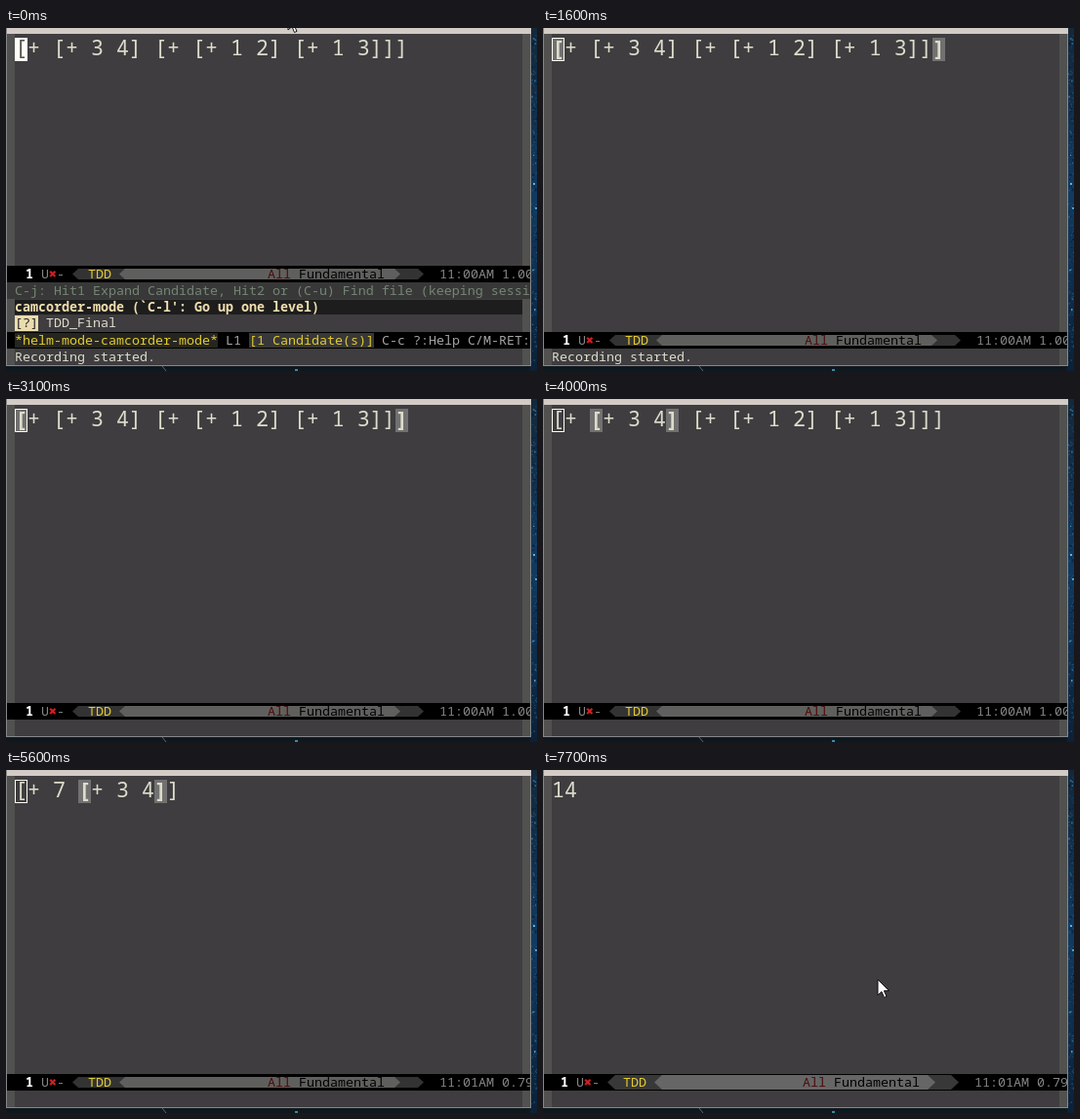
Recreate the animation shown at these times as an HTML page. Size 544x352 px, loop 7800 ms.

```html
<!DOCTYPE html>
<html lang="en">
<head>
<meta charset="utf-8">
<title>Stepwise evaluation</title>
<style>
  html, body { margin: 0; width: 100%; height: 100%; overflow: hidden; background: #10181f; }
  svg { display: block; width: 544px; height: 352px; }
  text { font: 13.333px "Noto Sans Mono", "DejaVu Sans Mono", monospace; white-space: pre; }
  .code text { font-size: 21.667px; fill: #dcdccc; }
  text.bold, .code text.bold { font-weight: 700; }
</style>
</head>
<body>
<svg id="stage" viewBox="0 0 544 352" xmlns="http://www.w3.org/2000/svg"></svg>
<script>
const LOOP = 7800;
const HELM_END = 300, BLUR = 1200, MSG_END = 2700, FOCUS = 7150, BLINK = 7650, MINUTE = 4070;
const CELL = 13, LEFT = 9;

// Buffer text, start time, and the columns of the matched brackets
const steps = [
  [0, "[+ [+ 3 4] [+ [+ 1 2] [+ 1 3]]]", []],
  [HELM_END, "[+ [+ 3 4] [+ [+ 1 2] [+ 1 3]]]", [0, 30]],
  [3550, "[+ [+ 3 4] [+ [+ 1 2] [+ 1 3]]]", [3, 9]],
  [4070, "[+ 7 [+ [+ 1 2] [+ 1 3]]]", [8, 14]],
  [4590, "[+ 7 [+ 3 [+ 1 3]]]", [10, 16]],
  [5110, "[+ 7 [+ 3 4]]", [5, 11]],
  [5630, "[+ 7 7]", [0, 6]],
  [6150, "14", []]
];

const rect = (x, y, w, h, fill, more = "") =>
  `<rect x="${x}" y="${y}" width="${w}" height="${h}" fill="${fill}" ${more}/>`;
const text = (x, y, s, fill, cls = "") =>
  `<text x="${x}" y="${y}" fill="${fill}" class="${cls}">${s}</text>`;

function random(seed) {
  return () => (seed = (seed * 16807) % 2147483647) / 2147483647;
}

function desktop() {
  const rnd = random(4711);
  const colors = ["#1c4a70", "#0b1c33", "#2b6f9c", "#0a2540", "#4aa3cf"];
  let out = rect(0, 0, 544, 352, "#10181f") + rect(537, 0, 7, 352, "url(#sky)");
  for (let i = 0; i < 230; i++) {
    const x = 538 + rnd() * 6, y = rnd() * 346, size = 0.6 + rnd() * 1.1;
    out += rect(x.toFixed(1), y.toFixed(1), size.toFixed(1), size.toFixed(1),
      colors[Math.floor(rnd() * rnd() * 5)]);
  }
  return out + rect(540, 159, 2, 2, "#55b8e6") + rect(542, 184, 2, 2, "#4aa3cf") +
    rect(296, 350, 3, 2, "#3b88a8") +
    `<path d="M160 347l4 5" stroke="#59666c"/>`;
}

function frame() {
  return rect(0, 0, 538, 347, "#85888a") + rect(1, 0, 537, 6, "#d3cbc5") +
    rect(1, 6, 536, 340, "#3f3d3f") +
    rect(1, 6, 8, 340, "#515150") + rect(529, 6, 8, 340, "#515150");
}

function arrowBar(x1, x2, y, h, tip, fill) {
  const mid = y + h / 2;
  return `<path fill="${fill}" d="M${x1} ${mid}L${x1 + tip} ${y}H${x2 - tip}L${x2} ${mid}L${x2 - tip} ${y + h}H${x1 + tip}Z"/>`;
}

function modeLine(y, active, clock) {
  const dx = active ? -2 : 0, base = y + 13;
  const top = active ? y + 1 : y + 3, h = active ? 15 : 11, tip = active ? 8 : 6;
  const label = (x, s, fill, cls) => text(x + dx, base, s, fill, cls);
  return rect(1, y, 536, 17, "#000") +
    arrowBar(68 + dx, 428 + dx, top, h, tip, active ? "#383838" : "#333") +
    arrowBar(116 + dx, 404 + dx, top, h, tip, active ? "#666" : "#5f605d") +
    label(20, "1", "#fff", "bold") + label(36, "U", "#858585") +
    label(44, "✖", "#d02020") + label(52, "-", "#858585") +
    label(84, "TDD", "#e3cc2e") + label(268, "All", "#4d0d0d") +
    label(300, "Fundamental", "#000") + label(444, clock, "#858585");
}

function helm() {
  return rect(1, 261, 536, 17, "#383838") +
    text(9, 274, "C-j: Hit1 Expand Candidate, Hit2 or (C-u) Find file (keeping session)", "#748574") +
    rect(9, 279, 520, 15, "#1d1d1d") +
    text(9, 291, "camcorder-mode (`C-l': Go up one level)", "#f0dfaf", "bold") +
    rect(9, 295, 24, 16, "#eadcae") + text(9, 307, "[?]", "#222") +
    text(41, 307, "TDD_Final", "#dcdccc") +
    rect(1, 312, 536, 17, "#000") + rect(9, 313, 208, 15, "#262620") +
    text(9, 325, "*helm-mode-camcorder-mode*", "#e3cc2e") + text(225, 325, "L1", "#a5a5a5") +
    rect(249, 313, 128, 15, "#383838") + text(249, 325, "[1 Candidate(s)]", "#e3cc2e") +
    text(385, 325, "C-c ?:Help C/M-RET:", "#a5a5a5");
}

function buffer([, code, marks], cursor) {
  const at = col => LEFT + col * CELL;
  let out = "";
  for (const col of marks) out += rect(at(col), 10, CELL, 24, "#717171");
  if (cursor === "solid") out += rect(LEFT, 10, CELL, 24, "#fffff6");
  const plain = [...code].map((c, i) =>
    marks.includes(i) || (i === 0 && cursor === "solid") ? " " : c).join("");
  out += text(LEFT, 28, plain, "#dcdccc");
  for (const col of marks) {
    if (col || cursor !== "solid") out += text(at(col), 28, code[col], "#dcdccc", "bold");
  }
  if (cursor === "solid") {
    out += `<text x="${LEFT}" y="28" style="fill:#55534c" class="${marks.includes(0) ? "bold" : ""}">${code[0]}</text>`;
  }
  if (cursor === "hollow") {
    out += rect(LEFT + 0.5, 10.5, CELL - 1, 23, "none", 'stroke="#fffff6"');
  }
  return `<g class="code">${out}</g>`;
}

const stage = document.getElementById("stage");
stage.innerHTML = `
  <defs>
    <linearGradient id="sky" x2="0" y2="1">
      <stop stop-color="#14283a"/><stop offset=".5" stop-color="#123a60"/><stop offset="1" stop-color="#0c2138"/>
    </linearGradient>
    <clipPath id="win"><rect width="538" height="347"/></clipPath>
  </defs>
  ${desktop()}${frame()}
  <g id="view" clip-path="url(#win)"></g>
  <path id="mouse" d="M0 0V16L4 12.5L6.5 18.5L9 17.4L6.4 11.6H11.5Z" fill="#fff" stroke="#111"/>`;
const view = document.getElementById("view");
const mouse = document.getElementById("mouse");

function moveMouse(t) {
  let x = 289, y = -14;
  if (t >= 1000 && t < 7100) {
    y = -40;
  } else if (t >= 7100) {
    const p = Math.min(1, (t - 7100) / 400), ease = 1 - (1 - p) ** 3;
    x = 300 + 43 * ease;
    y = -20 + 235 * ease;
  }
  mouse.setAttribute("transform", `translate(${x.toFixed(1)} ${y.toFixed(1)})`);
}

let shown = "";
function draw(now) {
  const t = now % LOOP;
  const step = steps.findLast(s => s[0] <= t);
  const prompt = t < HELM_END;
  const focused = t < BLUR || t >= FOCUS;
  const cursor = !focused ? "hollow" : t >= BLINK ? "none" : "solid";
  const clock = t < MINUTE ? "11:00AM 1.00" : "11:01AM 0.79";
  const message = t < MSG_END ? "Recording started." : "";
  const key = [step[0], focused, cursor, clock, message].join();
  if (key !== shown) {
    shown = key;
    view.innerHTML = buffer(step, cursor) +
      modeLine(prompt ? 244 : 312, focused && !prompt, clock) +
      (prompt ? helm() : "") + text(9, 342, message, "#dcdccc");
  }
  moveMouse(t);
}

const start = performance.now();
function tick() {
  draw(performance.now() - start);
  requestAnimationFrame(tick);
}
tick();
</script>
</body>
</html>
```
